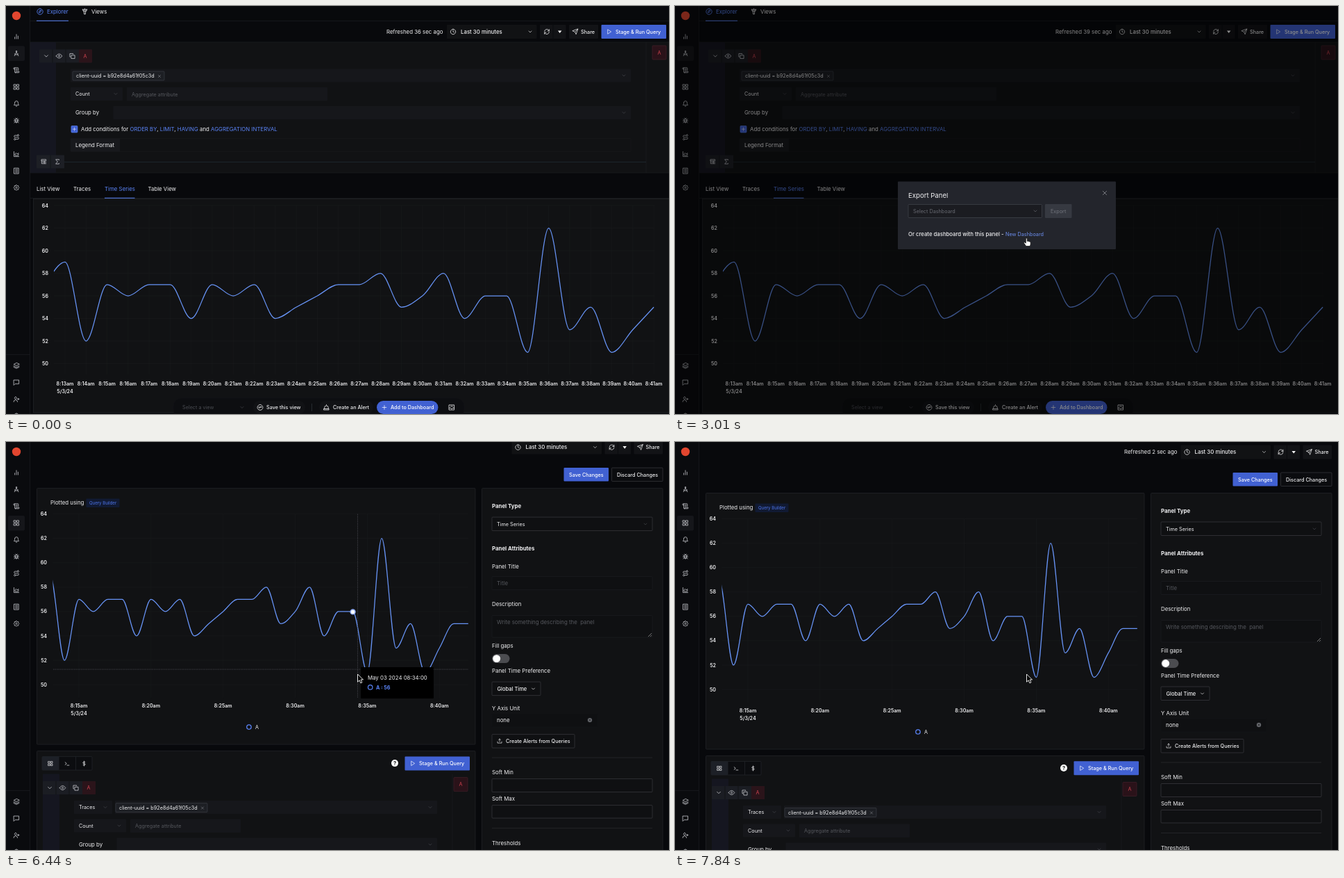
Recreate the animation shown at these times as an HTML page. Size 955 px wide and 587 px high, loop 8 s.

```html
<!DOCTYPE html>
<html lang="en">
<head>
<meta charset="utf-8">
<title>Export a chart to a dashboard</title>
<style>
html, body { margin: 0; width: 100%; height: 100%; overflow: hidden; background: #08090c; }
svg { display: block; }
text { font-family: Inter, sans-serif; white-space: pre; }
</style>
</head>
<body>
<svg id="stage" width="955" height="587" viewBox="0 0 955 587"></svg>
<script>
const INK = '#f0f0f2', DIM = '#55575d', BLUE = '#5b84f8', BUTTON = '#4161d2', EDGE = '#1c1d21', PANEL = '#111214';
const SMALL = 7.25, BASE = 7.85;

// Text is placed by its vertical centre.
const text = (x, y, s, { size = BASE, fill = INK, weight = 400, anchor = 'start', extra = '' } = {}) =>
  `<text x="${x}" y="${y + size * .36}" font-size="${size}" fill="${fill}" font-weight="${weight}" text-anchor="${anchor}" ${extra}>${s}</text>`;
const small = (x, y, s, fill = INK, weight = 400) => text(x, y, s, { size: SMALL, fill, weight });
const box = (x1, y1, x2, y2, fill = 'none', stroke = 'none', r = 1) =>
  `<rect x="${x1}" y="${y1}" width="${x2 - x1}" height="${y2 - y1}" rx="${r}" fill="${fill}" stroke="${stroke}" stroke-width=".7"/>`;
const line = (d, stroke = EDGE, width = .7, extra = '') =>
  `<path d="${d}" fill="none" stroke="${stroke}" stroke-width="${width}" ${extra}/>`;
const ring = (x, y, r, stroke, width = 1, fill = 'none') =>
  `<circle cx="${x}" cy="${y}" r="${r}" fill="${fill}" stroke="${stroke}" stroke-width="${width}"/>`;
const group = (id, content, attrs = '') => `<g id="${id}" ${attrs}>${content}</g>`;

// Icons live in a 24 unit square.
const ICONS = {
  bars: 'M18 20V10M12 20V4M6 20v-6',
  compass: 'M12 7L5 21M12 7l7 14M5 14c4 4 10 4 14 0M12 3a2 2 0 1 0 .1 0',
  scroll: 'M8 21h12a2 2 0 0 0 2-2v-2H10v2a2 2 0 1 1-4 0V5a2 2 0 1 0-4 0v3h4M6 3h11a2 2 0 0 1 2 2v8M10 8h5M10 12h5',
  grid: 'M3 3h7v7H3zM14 3h7v7h-7zM14 14h7v7h-7zM3 14h7v7H3z',
  bell: 'M6 8a6 6 0 0 1 12 0c0 7 3 9 3 9H3s3-2 3-9M10 21h4',
  bug: 'M8 10a4 4 0 0 1 8 0v6a4 4 0 0 1-8 0zM12 20v-9M3 13h5M16 13h5M4 7l4 3M20 7l-4 3M4 20l4-3M20 20l-4-3M9 3l2 3M15 3l-2 3',
  route: 'M6 16a3 3 0 1 0 .1 0M9 19h8a3.5 3.5 0 0 0 0-7H7a3.5 3.5 0 0 1 0-7h8M18 2a3 3 0 1 0 .1 0',
  area: 'M3 3v18h18M7 16V11l4-3 4 4 4-4v8z',
  receipt: 'M4 2h16v20H4zM8 7h8M8 12h8M8 17h8',
  gear: 'M12 9a3 3 0 1 0 .1 0M12 2l3 3h4v4l3 3-3 3v4h-4l-3 3-3-3H5v-4l-3-3 3-3V5h4z',
  layers: 'M12 2L2 7l10 5 10-5zM2 13l10 5 10-5M2 17l10 5 10-5',
  message: 'M3 3h18v14H7l-4 4z',
  user: 'M9 3a4 4 0 1 0 .1 0M2 21a7 7 0 0 1 14 0M19 8v6M16 11h6',
  circle: 'M12 2a10 10 0 1 0 .1 0',
  explore: 'M12 2a10 10 0 1 0 .1 0M16 8l-2 6-6 2 2-6z',
  views: 'M4 5h16M6 5v5h12V5M9 10l1 11h4l1-11M12 2v3',
  clock: 'M12 2a10 10 0 1 0 .1 0M12 6v6l4 2',
  down: 'M6 9l6 6 6-6',
  refresh: 'M3 11a9 9 0 0 1 16-5l2 3M21 3v6h-6M21 13a9 9 0 0 1-16 5l-2-3M3 21v-6h6',
  send: 'M22 2l-7 20-4-9-9-4zM22 2L11 13',
  play: 'M6 3l14 9-14 9z',
  eye: 'M1 12q11-16 22 0q-11 16-22 0M12 9a3 3 0 1 0 .1 0',
  copy: 'M9 9h12v12H9zM5 15H3V3h12v2',
  close: 'M6 6l12 12M18 6L6 18',
  plus: 'M12 4v16M4 12h16',
  data: 'M4 4h16v5H4zM4 9v10h16M8 14h12M14 9v10',
  sum: 'M18 6V4H6l7 8-7 8h12v-2',
  disk: 'M12 2a10 10 0 1 0 .1 0M6 11h12M8 15l8-6',
  alert: 'M5 17v-4a7 7 0 0 1 14 0v4M3 21h18v-4H3zM12 2v2',
  tray: 'M3 3h18v18H3zM3 14h5l2 3h4l2-3h5M8 8h8',
  term: 'M4 17l6-5-6-5M12 19h8',
  flask: 'M12 2v20M16 6H10a3 3 0 0 0 0 6h4a3 3 0 0 1 0 6H8',
  share: 'M12 15V3M8 7l4-4 4 4M3 15v6h18v-6',
};
const icon = (x, y, name, color = '#c9cacf', size = 9.5, weight = 2) =>
  `<path transform="translate(${x - size / 2} ${y - size / 2}) scale(${size / 24})" d="${ICONS[name]}" fill="none" stroke="${color}" stroke-width="${weight}" stroke-linecap="round" stroke-linejoin="round"/>`;
const chevron = (x, y, color = '#47494f') => icon(x, y, 'down', color, 8);

// Monotone cubic spline through one value per minute, starting at 8:12am.
const VALUES = [57,59,52,57,56,57,57,54,57,56,57,54,55,56,57,57,58,55,56,58,54,56,56,51,62,53,55,51,53,55,55];
function spline(x0, step, yOf, count) {
  const v = VALUES.slice(0, count), slope = v.slice(1).map((b, i) => b - v[i]);
  const tangent = v.map((_, i) => {
    const a = slope[i - 1] ?? slope[i], b = slope[i] ?? a;
    return a * b > 0 ? 2 * a * b / (a + b) : 0;
  });
  let d = `M${x0} ${yOf(v[0])}`;
  for (let i = 1; i < count; i++) {
    const x = x0 + i * step;
    d += `C${x - step * 2 / 3} ${yOf(v[i - 1] + tangent[i - 1] / 3)} ${x - step / 3} ${yOf(v[i] - tangent[i] / 3)} ${x} ${yOf(v[i])}`;
  }
  return d;
}

function chart(id, { x0, step, count, left, right, top, unit, bottom, labelX, labelY, firstLabel, every }) {
  const yOf = v => top + (64 - v) * unit, bold = { size: 7.1, weight: 600 };
  let s = `<clipPath id="${id}Clip"><rect x="${left}" width="${right - left}" height="587"/></clipPath>`;
  for (let v = 50; v <= 64; v += 2) {
    s += line(`M${left} ${yOf(v)}H${right}`, '#1a1b1e', .6);
    s += text(labelX, yOf(v), v, { ...bold, anchor: 'end' });
  }
  for (let m = firstLabel; m <= 41; m += every) {
    const x = x0 + (m - 12) * step;
    s += line(`M${x} ${top}V${bottom}`, '#1a1b1e', .6);
    s += text(x, labelY, `8:${m}am`, { ...bold, anchor: 'middle' });
    if (m === firstLabel) s += text(x, labelY + 10.5, '5/3/24', { ...bold, anchor: 'middle' });
  }
  return group(id, s + line(spline(x0, step, yOf, count), '#6793f5', 1.25, `clip-path="url(#${id}Clip)"`));
}

const stageButton = (x, y) => box(x, y - 10, x + 93.5, y + 10, BUTTON) +
  icon(x + 11.5, y, 'play', '#fff', 8) + small(x + 20.5, y, 'Stage &amp; Run Query', '#fff', 500);

// Time range, refresh and share controls.
const header = (shareRight) => box(635, 27, 764.5, 47, PANEL) + icon(644, 37, 'clock', INK, 9) +
  text(655, 37, 'Last 30 minutes', { weight: 500 }) + chevron(755, 37, INK) +
  box(769, 27, 806.5, 47, '#121316') + icon(779, 37, 'refresh', INK, 9) + line('M788 27V47', '#08090c') +
  '<path d="M795 35.5h5.4l-2.7 3.6z" fill="#fff"/>' +
  box(811, 27, shareRight, 47, '#121316') + icon(820, 37, 'send', INK, 9) + small(828, 37, 'Share', INK, 500);

// Query form shared by both pages.
function builder(right, stripLeft, aggregateRight, badgeX, togglesX, withSource) {
  const end = right - 22, shift = withSource ? 57 : 0, field = '#16171b';
  const select = (x, y, xEnd, label = '') => box(x, y - 9.5, xEnd, y + 9.5, field) + chevron(xEnd - 10, y) + small(x + 7, y, label);
  let s = box(stripLeft, 52, 72, 240, '#151620') + line(`M${right} 52V240`) +
    box(48, 62.5, 124, 81.5, '#1b1d23') + box(105, 62.5, 124, 81.5, '#2b141a') +
    icon(58, 72, 'down') + icon(76.5, 72, 'eye') + icon(95.5, 72, 'copy') +
    text(114, 72, 'A', { size: SMALL, fill: '#d0434f', anchor: 'middle' }) +
    line('M67 62.5V81.5M86 62.5V81.5', '#111214') +
    box(badgeX, 57, badgeX + 20, 77, '#2a1219', '#43202a') +
    text(badgeX + 10, 67, 'A', { size: SMALL, fill: '#c9404c', anchor: 'middle' });
  if (withSource) s += select(93, 100, 148, 'Traces');
  s += select(93 + (withSource ? 59 : 0), 100, end) + box(96 + shift, 94, 228 + shift, 107, '#1d1f24', '#3b3e46') +
    small(101 + shift, 100.5, 'client-uuid = b92e8d4a61f05c3d') + icon(221 + shift, 101, 'close', '#8d8f95', 6.5) +
    select(93, 126.5, 168, 'Count') + box(174, 117, aggregateRight, 136.5, field) + small(181, 127, 'Aggregate attribute', DIM) +
    text(100, 153.5, 'Group by') + select(154.5, 153.5, end) +
    box(94, 172.5, 103, 182, BUTTON, BLUE) + icon(98.5, 177.2, 'plus', '#fff', 6.5);
  const key = w => `<tspan fill="${BLUE}">${w}</tspan>`;
  s += text(108, 177, `Add conditions for ${key('ORDER BY')}, ${key('LIMIT')}, ${key('HAVING')} and ${key('AGGREGATION INTERVAL')}`) +
    box(93, 190.5, end, 209.5, 'none', '#18191c') + box(93, 190.5, 164, 209.5, '#18191d') + text(100, 200, 'Legend Format') +
    line(`M${togglesX + 40} 224.5H${right}`, '#222e37') + box(togglesX, 214.5, togglesX + 40, 233.5, '#1d1f25') +
    icon(togglesX + 10.5, 224, 'data') + icon(togglesX + 30, 224, 'sum') + line(`M${togglesX + 20} 214.5v19`, '#111214');
  return s;
}

const wide = { x0: 54.7, step: 30.29, count: 30, left: 69, right: 934, top: 287, unit: 16.25, bottom: 530, labelX: 61, labelY: 543.5, firstLabel: 13, every: 1 };

const explorer = icon(49, 8, 'explore', BLUE, 10) + text(59, 8, 'Explorer', { fill: BLUE }) +
  icon(113.5, 8, 'views', INK, 10) + text(123, 8, 'Views') +
  line('M34 21.5H955') + line('M44 21.3H90', BLUE, 1.1) +
  text(548, 37, '', { extra: 'id="refreshed"' }) + header(853) + stageButton(857.5, 37) +
  box(35, 52, 956, 240, PANEL, EDGE, 0) + builder(922, 35, 463, 931, 44) +
  text(44, 263.5, 'List View') + text(97, 263.5, 'Traces') + text(142, 263.5, 'Time Series', { fill: BLUE }) + text(204.5, 263.5, 'Table View') +
  line('M35 276.5H955') + line('M142 276.3H185.5', BLUE, 1.1) + box(39.5, 277.5, 956, 585, PANEL, '#26282c', 0) +
  chart('chartA', wide) + chart('chartB', { ...wide, x0: 54.5, step: 30.46, right: 939 }) +
  box(241, 564, 660, 592, '#0d0e11', '#131418', 12) + small(254, 577.5, 'Select a view', '#4a4c52') + chevron(340, 577.5) +
  box(356, 568, 431, 587, '#111215', 'none', 9) + icon(366, 577.5, 'disk', INK) + small(375, 577.5, 'Save this view', INK, 500) +
  line('M440.5 572V583', '#33353b') + box(451, 568, 529, 587, '#111215', 'none', 9) +
  icon(461.5, 577.5, 'alert', INK) + small(471, 577.5, 'Create an Alert', INK, 500) +
  `<rect id="addButton" x="534" y="568" width="88.5" height="19" rx="9.5"/>` +
  icon(545, 577.5, 'plus', '#fff', 8.5) + small(554, 577.5, 'Add to Dashboard', '#fff', 500) + icon(642, 577.5, 'tray', INK);

const modal = box(321, 252.5, 635, 350, '#23252c') + text(336, 273, 'Export Panel', { size: 9.6 }) + icon(619, 269, 'close', '#9b9ca2', 10.5, 1.6) +
  box(336, 285.5, 528.5, 304.5, '#1b1c21', '#43464e') + small(343, 295, 'Select Dashboard', '#686a72') + chevron(519, 295, '#686a72') +
  group('exportIdle', box(533, 285, 571.5, 305, '#363941') + small(541, 295, 'Export', '#71747c')) +
  group('exportBusy', box(533, 285, 584, 305, '#363941') + small(553, 295, 'Export', '#666972') +
    line('M544 292a3 3 0 0 1 3 3', '#6f7280', .9, 'id="spinner"')) +
  text(336, 328, 'Or create dashboard with this panel -', { weight: 500, size: 7.75 }) + small(476, 328, '<tspan id="newLink">New Dashboard</tspan>', 'inherit');

const label = (y, s, weight = 400) => text(700, y, s, { weight });
const input = (y1, y2, stroke, xEnd = 931) => box(700, y1, xEnd, y2, '#0f1012', stroke);
const outline = '#3b3c41';
const legend = (y) => ring(350, y, 3.2, BLUE, 1.3) + small(359, y, 'A');

const sidePanel = box(685.5, 73.5, 946, 700, PANEL, '#25262a') + label(99, 'Panel Type', 700) +
  input(115, 134.5, outline) + small(707, 125, 'Time Series') + chevron(921, 125) +
  label(160, 'Panel Attributes', 700) + label(186, 'Panel Title') + input(200.5, 219.5, '#1c1d21') + text(707, 210, 'Title', { fill: DIM }) +
  label(240, 'Description') + input(256.5, 288, '#1c1d21') + text(707, 266, 'Write something describing the  panel', { fill: DIM }) +
  line('M925 287l5-5M928 287l2-2', '#aaa', .7) + label(300, 'Fill gaps') +
  box(700, 312, 725.5, 325, '#4b4c50', 'none', 6.5) + '<circle cx="706.7" cy="318.5" r="5.4" fill="#fff"/>' +
  label(336, 'Panel Time Preference') + input(352, 371.5, outline, 770) + text(707.5, 362, 'Global Time', { size: 7.5, weight: 500 }) + chevron(759.5, 362, INK) +
  label(390, 'Y Axis Unit') + input(397.5, 417, '#141518', 852) + text(707, 407, 'none') +
  '<circle cx="841" cy="407" r="3.2" fill="#626469"/>' + icon(841, 407, 'close', '#111', 4.5, 3) +
  input(427.5, 447, outline, 819) + icon(711, 437, 'share', INK, 8) + small(720, 437, 'Create Alerts from Queries', INK, 500) +
  line('M700 461H931M700 562.5H931', '#2b2c30') + label(482.5, 'Soft Min') + input(491.5, 510.5, outline) +
  label(520, 'Soft Max') + input(529.5, 548, outline) + label(584, 'Thresholds') +
  box(700, 602.5, 931, 632.5, 'none', '#2d55cf', 3) +
  text(816, 618, '+ Add threshold', { size: 8.45, fill: '#3f66dc', weight: 500, anchor: 'middle', extra: 'letter-spacing=".3"' });

const hover = line('M506.5 110.5V375M68 334H666', '#4b4d53', .7, 'stroke-dasharray="1.5 1"') +
  ring(499.6, 251.3, 3.4, '#8eabf5', 1.6, '#fff') + box(511, 331, 616, 376, '#000') +
  text(521, 346, 'May 03 2024 08:34:00') + ring(524.7, 359.8, 3.2, BLUE, 1.2) + text(533, 360, 'A : 56', { size: SMALL, weight: 700, fill: BLUE });

const editor = group('since', text(647, 14.5, 'Refreshed 2 sec ago')) +
  `<g transform="translate(93.5 -22.5)">${header(852.5)}</g>` +
  group('editorBody',
    box(803.5, 44, 868, 63.5, BUTTON) + small(811, 54, 'Save Changes', '#fff', 500) +
    box(872.5, 44, 946, 63.5, '#0b0c0f', outline) + small(880, 54, 'Discard Changes', INK, 500) +
    box(44.5, 73.5, 676, 442, PANEL, '#25262a') + text(64, 94.5, 'Plotted using') +
    box(115.5, 88.5, 163.5, 101, '#111a33') + text(120, 95, 'Query Builder', { size: 6.05, fill: '#4d75ea' }) +
    group('loadingLegend', legend(199)) +
    group('plot', chart('chartC', { x0: 42.7, step: 20.77, count: 31, left: 67.5, right: 666, top: 110.5, unit: 17.54, bottom: 375, labelX: 59, labelY: 386.5, firstLabel: 15, every: 5 }) + legend(417) + group('hover', hover)) +
    box(44.5, 451.5, 676, 700, PANEL, '#25262a') + box(52, 459.5, 124, 479, '#0c0d10', '#25272c') + box(52, 459.5, 76.5, 479, '#1d2027') +
    icon(64, 469.5, 'grid', INK, 8) + icon(88, 469.5, 'term', INK, 8.5) + icon(112.5, 469.5, 'flask', INK, 8.5) + line('M100.5 459.5V479', '#25272c') +
    '<circle cx="560" cy="469" r="5" fill="#fff"/>' + text(560, 469, '?', { size: 7.5, weight: 700, fill: '#111', anchor: 'middle' }) + stageButton(574.5, 469.3) +
    `<g transform="translate(5 432.5)">${builder(638, 48, 333, 640, 57, true)}</g>` + sidePanel);

const sideIcons = ['bars', 'compass', 'scroll', 'grid', 'bell', 'bug', 'route', 'area', 'receipt', 'gear'];
const sidebar = box(0, 0, 34, 587, '#0a0b0e', 'none', 0) + line('M34.5 0V587M0 501.5H34') +
  '<rect id="active" x="3" width="24" height="21.5" rx="2" fill="#15161a"/><circle cx="15" cy="14" r="6.2" fill="#e2462f"/>' +
  sideIcons.map((n, i) => icon(15, 44 + i * 24.15, n)).join('') +
  ['layers', 'message', 'user', 'circle'].map((n, i) => icon(15, 517.5 + i * 24.2, n)).join('');

const pointer = group('cursor',
  group('arrow', '<path d="M0 0V11.2L2.6 8.8L4.4 12.8L6.4 11.9L4.6 8H8Z" fill="#000" stroke="#fff" stroke-width=".9"/>') +
  group('hand', '<path d="M-2.2 -5.2q1-1.4 2 0V-1.6q1.1-.8 1.8.3 1-.7 1.7.4 1.3-.4 1.4 1V3q-.4 1.6-1.2 2.6H-1.8L-5 .9q-.2-1.4 1.2-1l1.6 1.3Z" fill="#fff" stroke="#111" stroke-width=".8"/>'));

document.getElementById('stage').innerHTML = box(0, 0, 955, 587, '#08090c', 'none', 0) + group('explorer', explorer) + group('editor', editor) + sidebar +
  group('mask', '<rect width="955" height="587"/>') + group('modal', modal) + pointer;

const $ = id => document.getElementById(id);
const show = (id, on) => $(id).style.display = on ? '' : 'none';
const progress = (t, a, b) => Math.min(1, Math.max(0, (t - a) / (b - a)));
const smooth = p => p * p * (3 - 2 * p);

const NAVIGATE = 4620, BUSY = 3220;
// Cursor stops: time, x, y.
const STOPS = [[490, 524, 592], [1120, 570, 581], [2170, 570, 581], [2530, 501, 346], [2800, 507.5, 340], [8000, 507.5, 340]];
function cursorAt(t) {
  const i = Math.max(1, STOPS.findIndex(s => s[0] >= t));
  const [t0, x0, y0] = STOPS[i - 1], [t1, x1, y1] = STOPS[i], p = smooth(progress(t, t0, t1));
  return [x0 + (x1 - x0) * p, y0 + (y1 - y0) * p];
}

function draw(t) {
  const editing = t >= NAVIGATE;
  show('explorer', !editing);
  show('editor', editing);
  $('active').setAttribute('y', editing ? 106 : 57.5);

  $('refreshed').textContent = `Refreshed ${36 + Math.floor((t + 150) / 950)} sec ago`;
  show('chartA', t < 3300);
  show('chartB', t >= 3300);
  const lit = progress(t, 1330, 1540) * (1 - progress(t, 2170, 2370));
  $('addButton').setAttribute('fill', `rgb(${65 + 35 * lit},${97 + 34 * lit},${210 + 25 * lit})`);

  const open = 1 - (1 - progress(t, 1945, 2245)) ** 6, scale = .2 + .8 * open;
  show('mask', !editing);
  show('modal', !editing && open > 0);
  $('mask').setAttribute('opacity', .45 * progress(t, 1945, 2145));
  $('modal').setAttribute('opacity', open);
  $('modal').setAttribute('transform', `translate(572 582) scale(${scale}) translate(-572 -582)`);
  const busy = t >= BUSY;
  show('exportIdle', !busy);
  show('exportBusy', busy);
  $('spinner').setAttribute('transform', `rotate(${(t - 4200) * .36 + 180} 544 295)`);
  $('newLink').setAttribute('fill', busy ? '#2c4384' : t > 2600 ? '#6d8ff0' : '#4d74e6');

  const scroll = 82 * (smooth(progress(t, 6350, 6860)) - smooth(progress(t, 7500, 7840)));
  $('editor').setAttribute('transform', `translate(0 ${-scroll})`);
  show('editorBody', t >= 5040);
  show('since', t >= 7000);
  show('loadingLegend', t < 5600);
  show('plot', t >= 5600);
  show('hover', t >= 5880 && t < 7000 && scroll < 33);

  const hand = (t >= 1330 && t < 2170) || (t >= 2560 && !editing), [x, y] = cursorAt(t);
  show('cursor', t >= 490);
  show('hand', hand);
  show('arrow', !hand);
  $('cursor').setAttribute('transform', `translate(${x - (hand ? 0 : 1)} ${y - (hand ? 0 : 6)})`);
}

const start = performance.now();
(function frame() {
  draw((performance.now() - start) % 8000);
  requestAnimationFrame(frame);
})();
</script>
</body>
</html>
```
